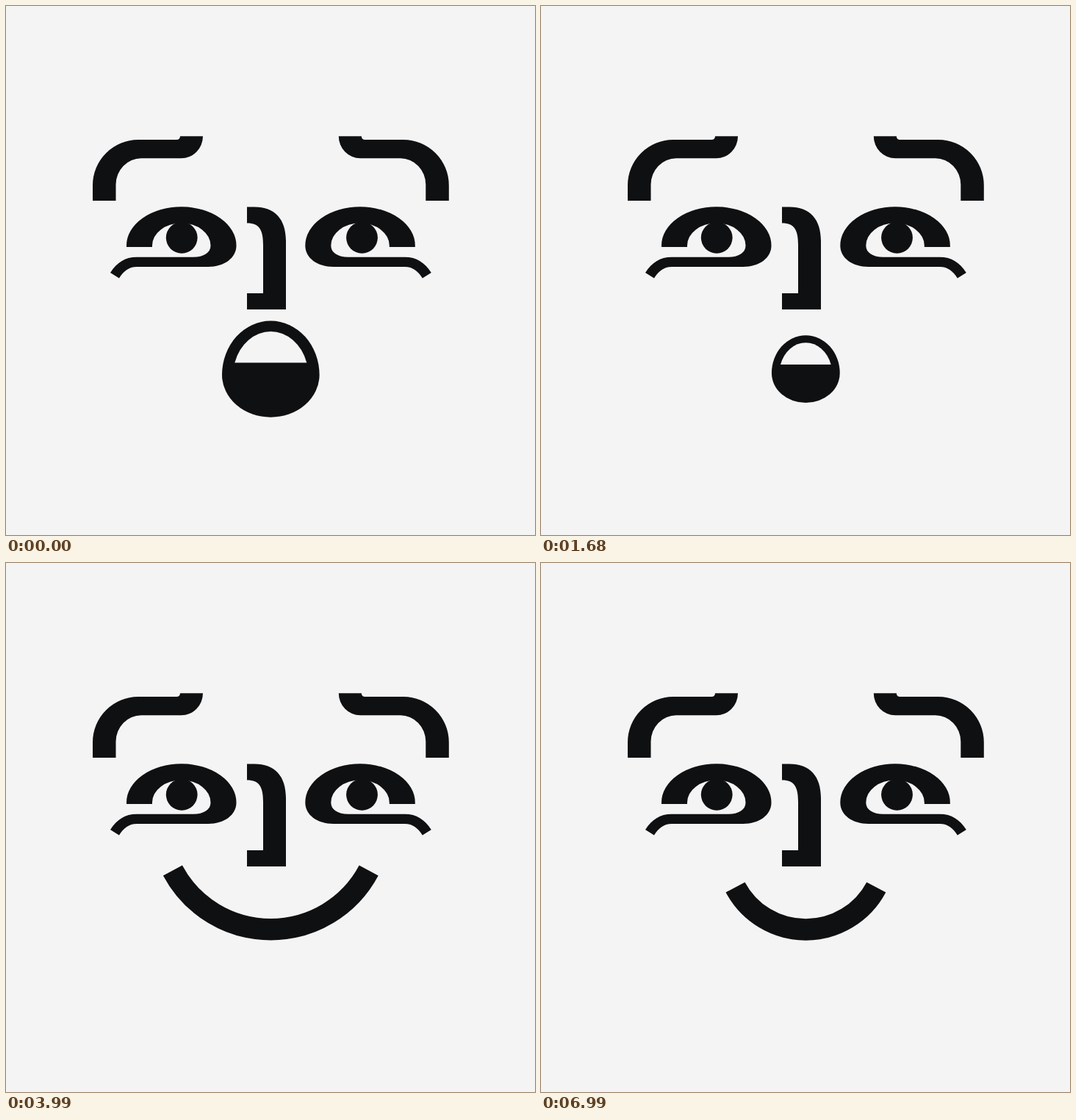
Animation of 720x720 px, one loop 7.41 s. Source, as an HTML page:

```html
<!DOCTYPE html>
<html lang="en">
<head>
<meta charset="utf-8">
<title>Face</title>
<style>
  html, body { margin: 0; height: 100%; overflow: hidden; background: #f4f4f4; }
  svg { display: block; width: 100%; height: 100%; fill: #0f1012; }
  .line { fill: none; stroke: #0f1012; }
</style>
</head>
<body>
<svg viewBox="0 0 720 720">
  <defs>
    <path id="brow" d="M118 265V244A62 62 0 0 1 180 182H232Q237 182 237 177.3H268A29.5 30 0 0 1 238.5 207.3H184A34.5 36 0 0 0 149.5 243V265Z"/>
    <path id="lid" d="M164 328V326A74.75 52.7 0 0 1 313.5 326V328H278.5V326A39.75 30.5 0 0 0 199 326V328Z"/>
    <path id="openEye" d="M164 328V326A74.75 52.7 0 0 1 313.5 326C313.5 343 297 355 275 355H178C167 355 160 361 154 370.5L142 363C151 349 162 341.7 178 341.7H255C269 341.7 278.5 336 278.5 326A39.75 30.5 0 0 0 199 326V328Z"/>
  </defs>

  <use id="leftBrow" href="#brow"/>
  <path d="M328 273.5H338C366 273.5 381 290 381 320V413H328V391H350V325C350 305 345 295.5 328 295.5Z"/>

  <g id="left">
    <g data-state="open"><use href="#openEye"/><circle cx="239.2" cy="315.3" r="21.4"/></g>
    <use data-state="happy" href="#lid"/>
    <use data-state="asleep" href="#lid" transform="translate(228 300.8) rotate(-10) scale(1 -1) translate(-238.75 -328)"/>
  </g>

  <g transform="translate(720.8) scale(-1 1)"><use href="#brow"/></g>
  <g id="right">
    <g data-state="open">
      <use href="#openEye" transform="translate(720.8) scale(-1 1)"/>
      <circle cx="484.5" cy="315.3" r="21.4"/>
    </g>
    <use data-state="happy" href="#lid" transform="translate(720.8) scale(-1 1)"/>
    <use data-state="asleep" href="#lid" transform="translate(490 301.8) rotate(10) scale(1 -1) translate(-238.75 -328)"/>
  </g>

  <g id="mouth">
    <g data-state="gasp" id="gasp">
      <path d="M294 502A66.3 73.5 0 0 1 426.6 502A66.3 57.8 0 0 1 294 502Z"/>
      <path fill="#f4f4f4" d="M311.3 485.5A51.5 61.4 0 0 1 409.3 485.5Z"/>
    </g>
    <g data-state="grin" class="line">
      <path stroke-width="20.5" d="M236 434.5Q360.3 463 484.5 434.5C493 432.5 502 439 500.5 449C489 514 432 564 360.3 564S231.5 514 220 449C218.5 439 227 432.5 236 434.5Z"/>
      <path stroke-width="12.5" d="M236 483Q360 507 484 481"/>
    </g>
    <path data-state="wide" class="line" stroke-width="29.5" d="M226.9 418.5A151.1 151.1 0 0 0 493.7 418.5"/>
    <path data-state="smile" class="line" stroke-width="29.5" d="M264.5 441.3A108.6 108.6 0 0 0 456.3 441.3"/>
  </g>
</svg>
<script>
const LOOP = 7410, STEP = 30;
const byId = id => document.getElementById(id);

// start time, mouth, left eye, right eye, left brow drop
const poses = [
  [0, 'gasp', 'open', 'open', 0],
  [1830, 'grin', 'open', 'open', 0],
  [2220, 'grin', 'happy', 'happy', 0],
  [2610, 'wide', 'happy', 'happy', 0],
  [3000, 'smile', 'open', 'open', 0],
  [3390, 'grin', 'open', 'open', 0],
  [3780, 'smile', 'open', 'open', 10],
  [3990, 'wide', 'open', 'open', 0],
  [4920, 'smile', 'asleep', 'asleep', 0],
  [6090, 'smile', 'open', 'asleep', 0],
  [6990, 'smile', 'open', 'open', 0]
];

function show(id, state) {
  for (const part of byId(id).children)
    part.style.display = part.dataset.state === state ? '' : 'none';
}

// Swells first, then shrinks quickly to 70 %.
function gaspScale(time) {
  const s = Math.min(1, Math.max(0, (time - 630) / 1050)), r = 1 - s;
  const shrink = 3 * r * r * s * -0.17 + 3 * r * s * s * -0.97 + s ** 3;
  return 1 - 0.3 * shrink;
}

function draw(time) {
  const [, mouth, left, right, drop] = poses.findLast(pose => pose[0] <= time);
  show('mouth', mouth);
  show('left', left);
  show('right', right);
  byId('leftBrow').setAttribute('transform', `translate(0 ${drop})`);
  byId('gasp').setAttribute('transform',
    `translate(360.4 494.2) scale(${gaspScale(time)}) translate(-360.4 -494.2)`);
}

const start = performance.now();
function tick() {
  const time = (performance.now() - start) % LOOP;
  draw(Math.floor(time / STEP) * STEP);
  requestAnimationFrame(tick);
}
tick();
</script>
</body>
</html>
```
